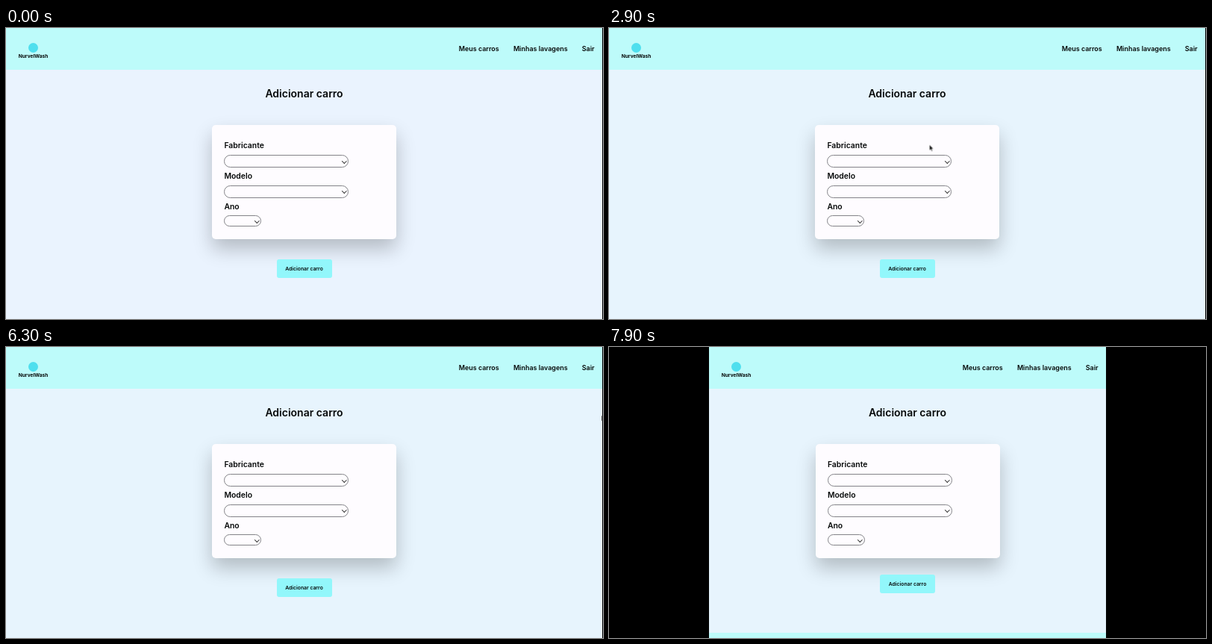
Animation, 800 px wide and 390 px high, one loop 8000 ms. Source, as an HTML page:

```html
<!DOCTYPE html>
<html lang="pt">
<head>
<meta charset="utf-8">
<title>Adicionar carro</title>
<style>
  @property --inset { syntax: "<length>"; inherits: true; initial-value: 0px; }

  html, body { margin: 0; width: 100%; height: 100%; overflow: hidden; background: #000; }
  body { position: relative; font: 600 9px/1 Inter, sans-serif; color: #050808; }
  body * { box-sizing: border-box; }

  .window, .window *, .cursor, .cursor *, .resize {
    animation-duration: 8s;
    animation-iteration-count: infinite;
    animation-timing-function: linear;
  }

  .window {
    position: absolute; top: 0; bottom: 0;
    left: var(--inset); right: max(1px, var(--inset));
    container-type: inline-size; overflow: hidden;
    background: #e7f4fd;
    animation-name: shrink, settle;
  }
  .window > *, .card > * { position: absolute; white-space: nowrap; }

  .header { top: 0; left: 0; right: 0; height: 56px; background: #bdfbfa; }
  .footer { top: calc(359.4px + 4.43cqw); left: 0; right: 0; height: 60px; background: #bdfbfa; }

  .mark { left: 29.5px; top: 20px; width: 13px; height: 13px; border-radius: 50%; background: #4fdfee; }
  .brand { left: 0; top: 32.5px; width: 73px; font-size: 6.6px; font-weight: 700; line-height: 10px; text-align: center; }

  nav { top: 14px; right: .8px; display: flex; font-size: 8.95px; line-height: 28px; }
  nav span { padding: 0 9.6px; border-radius: 3px; }
  .exit { animation-name: hover-exit; }
  .washes { animation-name: hover-washes; }

  h1 { margin: 0; left: 0; right: 0; top: 77.5px; font-size: 14px; font-weight: 600; line-height: 20px; text-align: center; }

  .card {
    left: calc(50% - 123.5px); top: 129.5px; width: 247px; height: 153.5px;
    border-radius: 5px; background: #fefcff;
    box-shadow: 0 13px 26px rgba(0, 0, 0, .23);
  }
  .card label { left: 16.4px; top: var(--y); font-size: 10.4px; line-height: 14px; }
  .select {
    left: 16.4px; top: var(--y); width: 167px; height: 17px;
    border: 1px solid #838388; border-radius: 9px;
  }
  .select.small { width: 50px; height: 15px; }
  .select::after {
    content: ""; position: absolute; right: 3px; top: calc(50% - 2.6px);
    width: 3.6px; height: 3.6px; transform: rotate(45deg);
    border: solid #222; border-width: 0 1px 1px 0;
  }

  .button {
    left: calc(50% - 37px); top: calc(294.4px + 1.95cqw); width: 74px; height: 25px;
    border-radius: 3px; background: #92f7fb;
    font-size: 6.8px; line-height: 25px; text-align: center;
    animation-name: hover-button;
  }

  .cursor { position: absolute; left: 0; top: 0; width: 0; height: 0; animation-name: travel; }
  .cursor svg { position: absolute; left: 0; top: 0; overflow: visible; width: 12px; height: 14px; }
  .arrow { animation-name: show-arrow; animation-timing-function: step-end; }
  .hand { opacity: 0; animation-name: show-hand; animation-timing-function: step-end; }
  .resize {
    position: absolute; right: 0; top: 92px; width: 2px; height: 7px; border-radius: 1px;
    background: #444; opacity: 0;
    animation-name: show-resize; animation-timing-function: step-end;
  }

  @keyframes shrink {
    0% { --inset: 0px; }
    83.75% { --inset: 0px; animation-timing-function: steps(3); }
    87.5% { --inset: 55px; animation-timing-function: steps(6); }
    95% { --inset: 106px; animation-timing-function: steps(3); }
    98.75%, 100% { --inset: 134px; }
  }
  @keyframes settle {
    0% { background-color: #eaf3fe; }
    2.5% { background-color: #eaf3fe; animation-timing-function: steps(9); }
    13.75%, 100% { background-color: #e7f4fd; }
  }
  @keyframes hover-exit {
    0%, 15% { background-color: #b4f7fd00; animation-timing-function: steps(2); }
    17.5% { background-color: #b4f7fd; animation-timing-function: steps(2); }
    20%, 100% { background-color: #b4f7fd00; }
  }
  @keyframes hover-washes {
    0% { background-color: #b4f7fd00; font-size: 8.95px; }
    20% { background-color: #b4f7fd00; font-size: 8.95px; animation-timing-function: steps(3); }
    23.75% { background-color: #b4f7fd; font-size: 9.13px; }
    25% { background-color: #b4f7fd; font-size: 9.13px; animation-timing-function: steps(3); }
    28.75%, 100% { background-color: #b4f7fd00; font-size: 8.95px; }
  }
  @keyframes hover-button {
    0% { background-color: #92f7fb; }
    53.75% { background-color: #92f7fb; animation-timing-function: steps(4); }
    58.75% { background-color: #7edaf9; }
    62.5% { background-color: #7edaf9; animation-timing-function: steps(5); }
    68.75%, 100% { background-color: #92f7fb; }
  }
  @keyframes travel {
    0% { transform: translate(812px, 34px); }
    13.75% { transform: translate(812px, 34px); animation-timing-function: steps(1); }
    15% { transform: translate(790px, 34px); animation-timing-function: steps(4); }
    20% { transform: translate(755px, 33px); animation-timing-function: steps(3); }
    23.75% { transform: translate(733px, 34.5px); }
    25% { transform: translate(733px, 34.5px); animation-timing-function: steps(6); }
    32.5% { transform: translate(454px, 149.5px); }
    35% { transform: translate(454px, 149.5px); animation-timing-function: steps(1); }
    36.25% { transform: translate(429.5px, 156.5px); animation-timing-function: steps(3); }
    40% { transform: translate(412.5px, 183px); }
    46.25% { transform: translate(412.5px, 182px); animation-timing-function: steps(7); }
    55% { transform: translate(405px, 320.5px); }
    62.5% { transform: translate(405px, 320.5px); animation-timing-function: steps(5); }
    68.75% { transform: translate(738.5px, 102.5px); animation-timing-function: steps(3); }
    72.5% { transform: translate(757px, 96.5px); }
    75% { transform: translate(757px, 96.5px); animation-timing-function: steps(3); }
    78.75%, 100% { transform: translate(812px, 93px); }
  }
  @keyframes show-arrow {
    0% { opacity: 0; }
    26.25% { opacity: 1; }
    55% { opacity: 0; }
    63.75% { opacity: 1; }
    78.75%, 100% { opacity: 0; }
  }
  @keyframes show-hand {
    0% { opacity: 0; }
    15% { opacity: 1; }
    26.25% { opacity: 0; }
    55% { opacity: 1; }
    63.75%, 100% { opacity: 0; }
  }
  @keyframes show-resize {
    0% { opacity: 0; }
    78.75% { opacity: 1; }
    85%, 100% { opacity: 0; }
  }
</style>
</head>
<body>
  <div class="window">
    <div class="header"></div>
    <div class="mark"></div>
    <div class="brand">NurvelWash</div>
    <nav>
      <span>Meus carros</span>
      <span class="washes">Minhas lavagens</span>
      <span class="exit">Sair</span>
    </nav>
    <h1>Adicionar carro</h1>
    <div class="card">
      <label style="--y: 21.5px">Fabricante</label>
      <div class="select" style="--y: 40.5px"></div>
      <label style="--y: 62px">Modelo</label>
      <div class="select" style="--y: 81px"></div>
      <label style="--y: 103px">Ano</label>
      <div class="select small" style="--y: 121.5px"></div>
    </div>
    <div class="button">Adicionar carro</div>
    <div class="footer"></div>
  </div>
  <div class="resize"></div>
  <div class="cursor">
    <svg class="arrow" viewBox="0 0 12 14">
      <path d="M0 0V7.6L1.7 6.1L2.9 8.8L4.1 8.3L2.9 5.6H5.2Z" fill="#111" stroke="#fff" stroke-width=".5"/>
    </svg>
    <svg class="hand" viewBox="0 0 12 14">
      <path d="M-.6 5V.8Q0-.2 .7.8V3.6Q1.5 3 2 3.8Q2.8 3.3 3.3 4.1Q4.5 3.9 4.5 5V7L3.7 9.4H-.5L-2.8 6Q-2.6 4.8-1.5 5.6L-.6 6.4Z" fill="#fff" stroke="#222" stroke-width=".7"/>
    </svg>
  </div>
</body>
</html>
```
